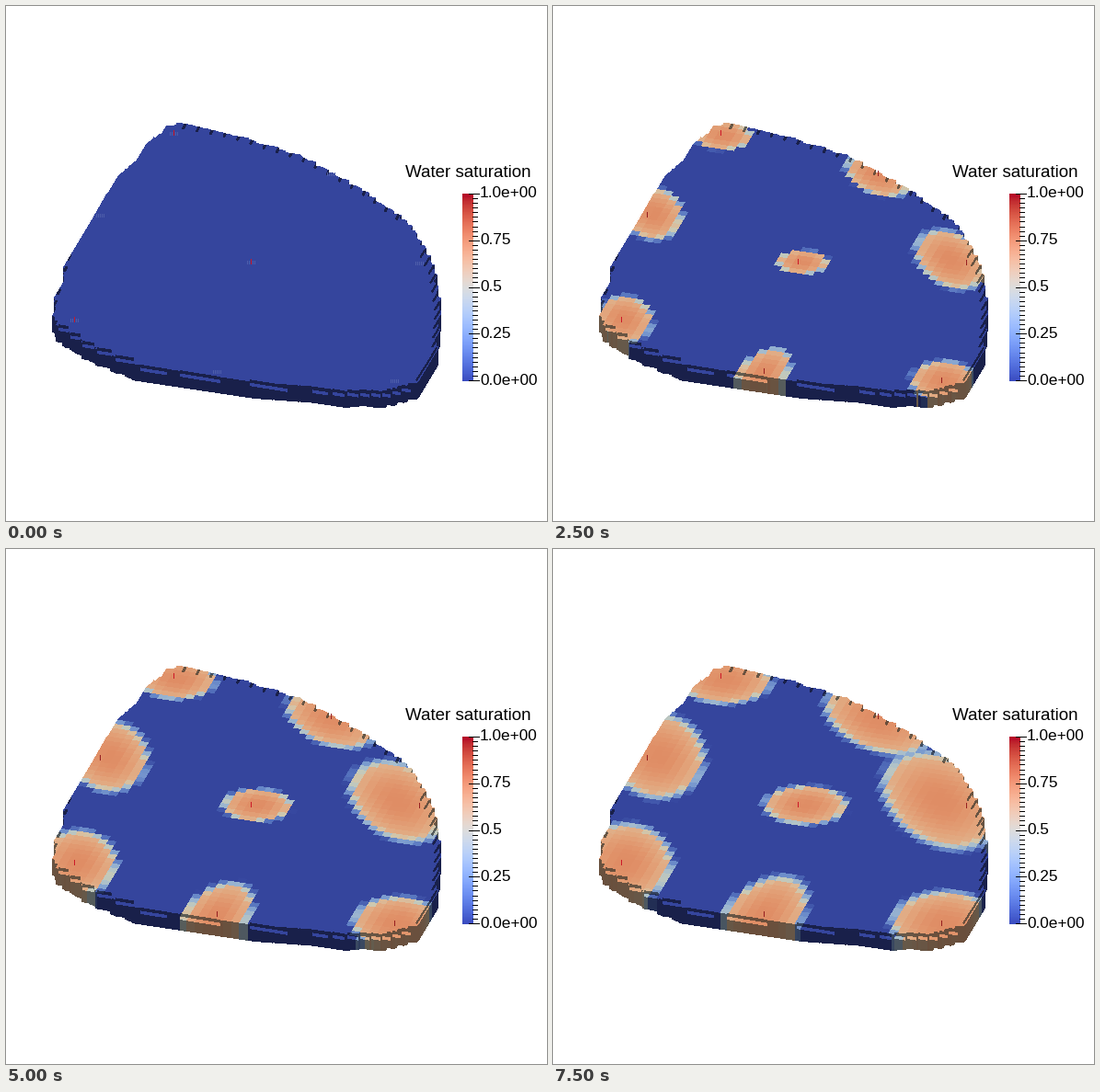
Write a matplotlib script that moves like this. It is 588x560 px and loops after 8000 ms.

```python
import numpy as np
import matplotlib
import matplotlib.pyplot as plt
from matplotlib.animation import FuncAnimation
from matplotlib.path import Path

W, H, DPI = 588, 560, 100
FRAMES, STEP = 16, 500
DEPTH = 18                      # wall height
SIDE = 0.47                     # wall brightness
GROWTH = 0.45                   # fronts spread as t ** GROWTH
U, V = (9.0, 1.35), (-2.7, 4.5)  # grid cell edges on screen
LIGHT = np.array([0.915, 0.915, 0.82])
COOLWARM = matplotlib.colormaps["coolwarm"]

# rims of the block, clockwise
BACK = [(186, 127), (243, 138), (320, 162), (385, 198), (437, 235)]
RIGHT = [(453, 260), (465, 284), (471, 325), (467, 376)]
FRONT = [(446, 408), (410, 418), (357, 417), (240, 404),
         (143, 390), (85, 366), (53, 344)]
LEFT = [(51, 327), (69, 268), (107, 203), (160, 143), (175, 130)]

# well x, y; front centre offset, radii and lean at the last step
WELLS = [(182, 138, 5, 4, 52, 27, 0), (102, 227, 13, -2, 51, 48, 0),
         (74, 341, 4, -1, 53, 44, 0), (353, 182, 0, 3, 60, 37, .25),
         (449, 279, -28, -6, 66, 53, .25), (266, 278, 8, 0, 47, 22, 0),
         (229, 397, -3, 3, 52, 42, -.4), (422, 407, 3, 0, 60, 37, 0)]
EARLY_RED = (0, 2, 5)

yy, xx = np.mgrid[0:H, 0:W]


def cell_centres():
    """Centre of the skewed grid cell that holds each pixel."""
    basis = np.array([U, V]).T
    x0, y0 = WELLS[5][:2]
    rel = np.stack([xx - x0, yy - y0]).reshape(2, -1)
    c = basis @ np.floor(np.linalg.inv(basis) @ rel + .5)
    return (c[0] + x0).reshape(H, W), (c[1] + y0).reshape(H, W)


def walk(rim, step):
    """Evenly spaced points along a rim."""
    p = np.array(rim, float)
    s = np.r_[0, np.cumsum(np.hypot(*np.diff(p, axis=0).T))]
    at = np.arange(step / 2, s[-1], step)
    return zip(np.interp(at, s, p[:, 0]), np.interp(at, s, p[:, 1]))


def stroke(x, y, dx, dy, width):
    """Mask of a straight stroke from (x, y)."""
    t = np.clip(((xx - x) * dx + (yy - y) * dy) / (dx * dx + dy * dy), 0, 1)
    return np.hypot(xx - x - t * dx, yy - y - t * dy) <= width / 2


def ledges():
    """Masks of the dark steps and the treads below them on the front rim."""
    riser, tread = np.zeros((2, H, W), bool)
    fx, fy = np.array(FRONT[::-1]).T
    x = 57
    while x < 430:
        run = 9 + 40 * np.exp(-((x - 220) / 90) ** 2)
        drop = yy - np.interp(x, fx, fy) - .16 * (xx - x)
        span = (xx >= x) & (xx < x + run)
        riser |= span & (drop >= -1) & (drop < 2.5)
        tread |= span & (drop >= 2.5) & (drop < 6)
        x += run * (1 + run / 60)
    return riser, tread


def build_block():
    # halfway between pixel and cell gives shallow teeth on the rim
    pts = np.c_[(xx + cx).ravel(), (yy + cy).ravel()] / 2
    top = Path(BACK + RIGHT + FRONT + LEFT).contains_points(pts).reshape(H, W)
    solid = top.copy()
    for k in range(DEPTH):
        solid[1 + k:] |= top[:H - 1 - k]
    dark, tread = ledges()
    top |= dark | tread
    for x, y in [*walk(BACK, 15), *walk(LEFT[:2], 13)]:
        dark |= stroke(x + 1, y, -2, 4, 3)
    for x, y in walk(RIGHT, 10):
        dark |= stroke(x, y, -5, 8, 2.4)
    dark |= stroke(463, 379, -17, 27, 2.2)
    above = np.maximum.accumulate(np.where(top, yy, 0), axis=0)
    return solid, top & ~dark, above


cx, cy = cell_centres()
solid, lit, source_row = build_block()


def saturation(t):
    s = np.zeros((H, W))
    if t == 0:
        return s
    g = (t / 7.5) ** GROWTH
    for x, y, ox, oy, rx, ry, lean in WELLS:
        dx, dy = cx - x - ox * g, cy - y - oy * g
        d = np.hypot(dx / rx, (dy - lean * dx) / ry) / g
        front = np.clip((1.05 - d) / .22, 0, 1)
        s = np.maximum(s, (.75 - .16 * d ** 2) * front)
    return s


def draw_wells(img, t):
    for k, (x, y, *_) in enumerate(WELLS):
        red = k in EARLY_RED
        if t == 0:
            img[y - 1:y + 3, x - 4:x + 5:2] = np.array([78, 94, 170]) / 255
        if t > 0 or red:
            colour = [205, 25, 40] if red else [150, 30, 32]
            img[y - 3:y + 3, x] = np.array(colour) / 255


def draw_bar(img):
    img[204:408, 496:508] = COOLWARM(np.linspace(1, 0, 204))[:, None, :3]
    for k in range(41):
        y = round(407 - k * 5.075)
        img[y, 507:513] = 0
        if k % 10 == 0:
            img[y, 503:515] = 0


def render(t):
    s = saturation(t)[source_row, xx] * np.where(lit, 1, .9)
    colour = COOLWARM(s)[..., :3] * LIGHT * np.where(lit, 1, SIDE)[..., None]
    img = np.where(solid[..., None], colour, 1.0)
    draw_wells(img, t)
    draw_bar(img)
    return img


fig = plt.figure(figsize=(W / DPI, H / DPI), dpi=DPI, facecolor="white")
ax = fig.add_axes([0, 0, 1, 1])
ax.axis("off")
picture = ax.imshow(render(0), interpolation="nearest", aspect="auto")


def label(x, y, text, px):
    fig.text(x / W, 1 - y / H, text, fontsize=px * 72 / DPI,
             family="Liberation Sans", color="black", va="baseline")


label(434, 186, "Water saturation", 18.8)
for k, text in enumerate(["1.0e+00", "0.75", "0.5", "0.25", "0.0e+00"]):
    label(515, 208 + 51 * k, text, 17.2)


def update(n):
    picture.set_data(render(n * STEP / 1000))
    return [picture]


anim = FuncAnimation(fig, update, frames=FRAMES, interval=STEP,
                     repeat=True, repeat_delay=0)
plt.show()
```
